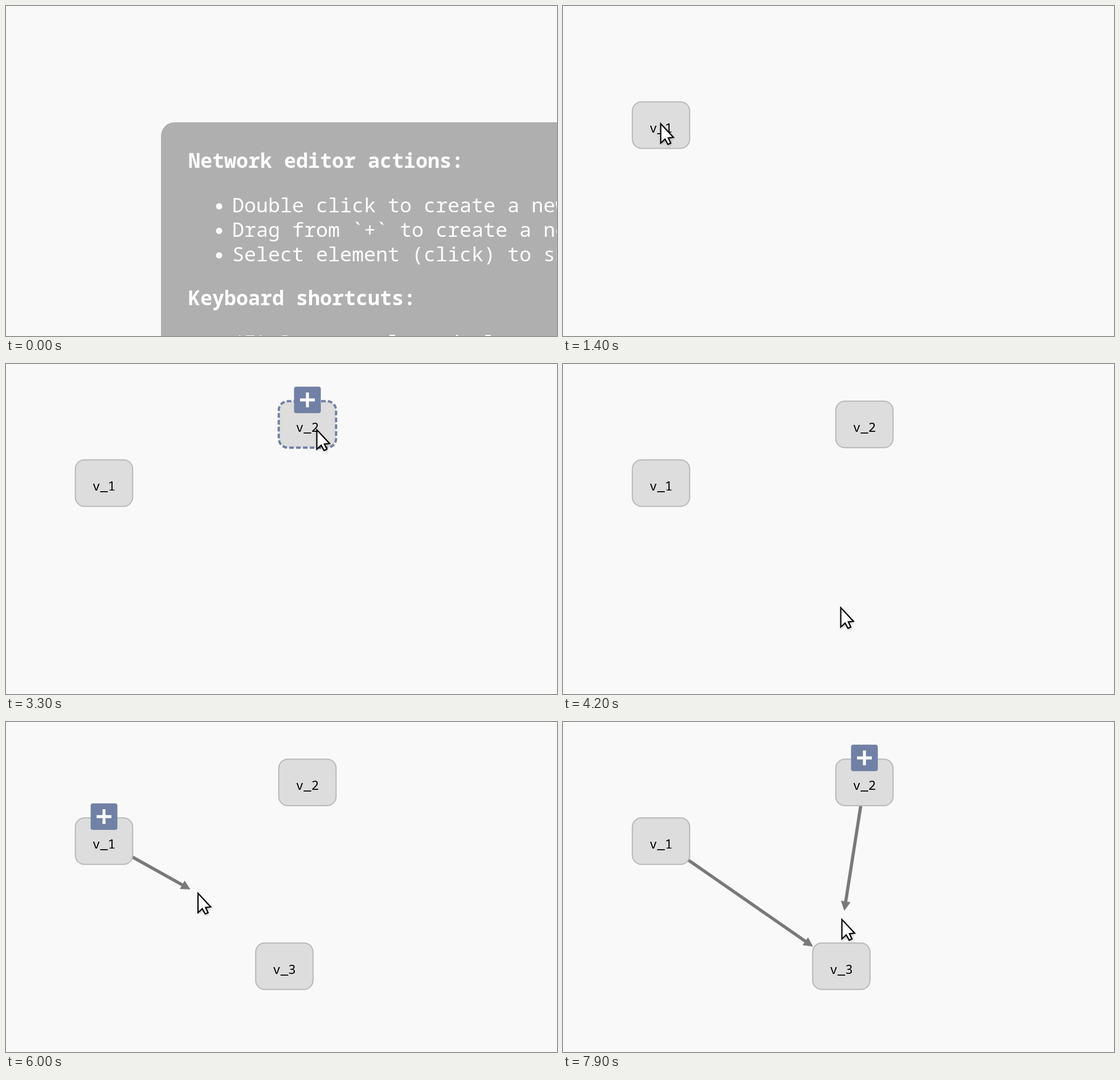
An HTML page with a canvas that plays this animation: 967x579 px, repeating every 8 s.

```html
<!DOCTYPE html>
<html lang="en">
<head>
<meta charset="utf-8">
<title>Network editor</title>
<style>
  html, body { margin: 0; width: 100%; height: 100%; overflow: hidden; background: #f9f9f9; }
  canvas { display: block; }
</style>
</head>
<body>
<canvas id="stage" width="967" height="579"></canvas>
<script>
const ctx = document.getElementById('stage').getContext('2d');
const LOOP = 8000, STEP = 100;
const BLUE = '#7180a5', EDGE = '#797979';
const FONT = '"Noto Sans Mono", "DejaVu Sans Mono", monospace';

// born: node appears; armed: first pointer movement after that
const v1 = { label: 'v_1', x: 172, y: 209, born: 1400, armed: 1900 };
const v2 = { label: 'v_2', x: 529, y: 106, born: 2900, armed: 3300 };
const v3 = { label: 'v_3', x: 488.5, y: 428.5, born: 4300, armed: 4600 };
const nodes = [v1, v2, v3];

// Pointer path: time, x, y
const path = [
  [500, 27, 245], [700, 75, 233], [900, 160, 209], [1000, 171, 206],
  [1800, 171, 206], [1900, 240, 185], [2200, 510, 108], [2300, 528, 103],
  [3200, 528, 103], [3300, 545, 115], [3400, 570, 150], [3500, 575, 205],
  [3700, 535, 345], [3900, 487, 427],
  [4500, 487, 427], [4600, 420, 385], [5000, 230, 222], [5200, 187, 196], [5400, 174, 161],
  [5600, 174, 161], [5700, 182, 168], [5800, 228, 208], [6200, 445, 392], [6400, 484, 420],
  [6600, 484, 420], [6700, 478, 414], [6800, 476, 382], [7000, 486, 260],
  [7200, 508, 130], [7300, 516, 90], [7500, 520, 60],
  [7600, 520, 59], [7700, 520, 59], [7800, 508, 190], [7900, 489, 346]
];
const clicks = [[1200, 1400, v1], [2600, 2800, v2], [4100, 4200, v3]];
const handles = [
  [1900, 2700, v1], [3300, 4200, v2], [4600, 5100, v3],
  [5100, 6700, v1], [6800, 7200, v3], [7200, LOOP, v2]
];

const during = (t, list) => list.find(([from, to]) => t >= from && t < to)?.[2];

function pointerAt(t) {
  if (t < path[0][0]) return null;
  const i = path.findIndex(key => key[0] > t);
  if (i < 0) return { x: path.at(-1)[1], y: path.at(-1)[2] };
  const [t0, x0, y0] = path[i - 1], [t1, x1, y1] = path[i];
  const u = (t - t0) / (t1 - t0);
  return { x: x0 + (x1 - x0) * u, y: y0 + (y1 - y0) * u };
}

function isOver(node, p, handle) {
  const dx = Math.abs(p.x - node.x), dy = p.y - node.y;
  return dx < 51 && Math.abs(dy) < 41 || node === handle && dx < 23 && dy > -67 && dy < 0;
}

function box(x, y, w, h, r, fill) {
  ctx.fillStyle = fill;
  ctx.beginPath();
  ctx.roundRect(x, y, w, h, r);
  ctx.fill();
}

function disc(x, y, r, fill) {
  ctx.fillStyle = fill;
  ctx.beginPath();
  ctx.arc(x, y, r, 0, 2 * Math.PI);
  ctx.fill();
}

function write(text, x, y, size, weight, fill, align = 'left') {
  ctx.font = `${weight} ${size}px ${FONT}`;
  ctx.textAlign = align;
  ctx.fillStyle = fill;
  ctx.fillText(text, x, y);
}

function drawHelp() {
  box(272, 204, 760, 500, 24, '#afafaf');
  write('Network editor actions:', 320, 284, 35, 600, '#fff');
  write('Keyboard shortcuts:', 320, 525, 35, 600, '#fff');
  const items = [
    ['Double click to create a new node', 362],
    ['Drag from `+` to create a new edge', 405],
    ['Select element (click) to show menu', 448],
    ['(E) Remove selected element', 603]
  ];
  for (const [text, y] of items) {
    disc(374, y - 10.5, 5.5, '#fff');
    write(text, 397, y, 35, 400, '#fff');
  }
}

function drawNode({ x, y, label }, hovered) {
  const w = 50.3, h = 40.8, r = 16;
  ctx.beginPath();
  ctx.moveTo(x, y - h);
  ctx.arcTo(x + w, y - h, x + w, y, r);
  ctx.arcTo(x + w, y + h, x, y + h, r);
  ctx.arcTo(x - w, y + h, x - w, y, r);
  ctx.arcTo(x - w, y - h, x, y - h, r);
  ctx.closePath();
  ctx.fillStyle = '#ddd';
  ctx.fill();
  ctx.lineWidth = hovered ? 4 : 2;
  ctx.strokeStyle = hovered ? BLUE : '#b8b8b8';
  ctx.setLineDash(hovered ? [8, 4] : []);
  ctx.stroke();
  ctx.setLineDash([]);
  write(label, x, y + 13, 22.4, 400, '#000', 'center');
}

function drawHandle({ x, y }) {
  const cy = y - 43;
  box(x - 23.5, cy - 23.3, 47, 46.6, 4, BLUE);
  ctx.fillStyle = '#fff';
  ctx.fillRect(x - 13, cy - 2.6, 26, 5.2);
  ctx.fillRect(x - 2.6, cy - 13, 5.2, 26);
}

// Arrow from a node's centre, its tip stopping `gap` before the goal
function drawEdge(from, goal, gap) {
  const dx = goal.x - from.x, dy = goal.y - from.y;
  const tip = Math.hypot(dx, dy) - gap;
  if (tip < 60) return;
  ctx.save();
  ctx.translate(from.x, from.y);
  ctx.rotate(Math.atan2(dy, dx));
  ctx.fillStyle = EDGE;
  ctx.fillRect(0, -2.8, tip - 14, 5.6);
  ctx.beginPath();
  ctx.moveTo(tip, 0);
  ctx.lineTo(tip - 16.5, -8.5);
  ctx.lineTo(tip - 16.5, 8.5);
  ctx.fill();
  ctx.restore();
}

function drawPointer({ x, y }) {
  const arrow = new Path2D('M0 0V34L7.6 27L12.7 36.3L17.6 34L13.2 25L22.3 24Z');
  ctx.save();
  ctx.translate(x + 0.5, y + 0.5);
  ctx.shadowColor = 'rgba(0,0,0,.4)';
  ctx.shadowBlur = 4;
  ctx.shadowOffsetX = 1;
  ctx.shadowOffsetY = 2;
  ctx.fillStyle = '#fff';
  ctx.fill(arrow);
  ctx.shadowColor = 'transparent';
  ctx.strokeStyle = '#000';
  ctx.lineWidth = 2.2;
  ctx.stroke(arrow);
  ctx.restore();
}

function draw(t) {
  const pointer = pointerAt(t), handle = during(t, handles), click = during(t, clicks);
  const hovers = node => pointer && t >= node.armed && isOver(node, pointer, handle);
  const ghost = pointer && { x: pointer.x + 2, y: pointer.y + 2 };

  ctx.fillStyle = '#f9f9f9';
  ctx.fillRect(0, 0, 967, 579);
  if (t < v1.born) drawHelp();

  if (t >= 6400 || t >= 5700 && hovers(v3)) drawEdge(v1, v3, hovers(v3) ? 62 : 60.5);
  else if (t >= 5700) drawEdge(v1, ghost, 17);
  if (t >= 7800) drawEdge(v2, ghost, 17);

  for (const node of nodes) if (t >= node.born) drawNode(node, hovers(node));
  if (handle) drawHandle(handle);
  if (click) disc(click.x, click.y, 58.2, 'rgba(0,0,0,.145)');
  if (pointer) drawPointer(pointer);
}

function tick() {
  draw(Math.floor(performance.now() % LOOP / STEP) * STEP);
  requestAnimationFrame(tick);
}
tick();
</script>
</body>
</html>
```
